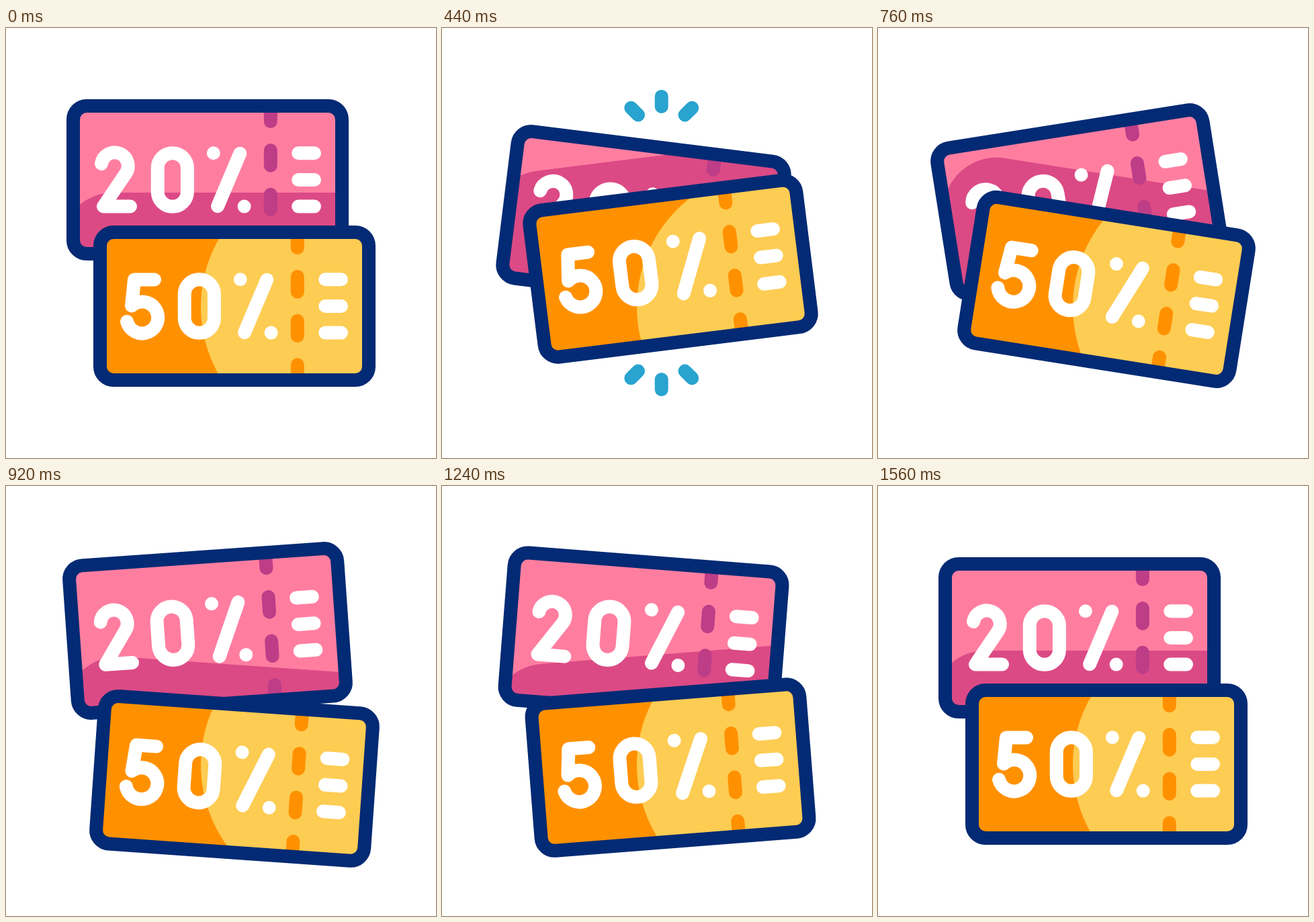
Recreate the animation shown at these times as an HTML page without scripts. Size 640 by 640 pixels, loop 2.04 s.

```html
<!DOCTYPE html>
<html lang="en">
<head>
<meta charset="utf-8">
<title>Discount coupons</title>
<style>
  @property --head { syntax: "<number>"; inherits: true; initial-value: 0; }
  @property --tail { syntax: "<number>"; inherits: true; initial-value: 0; }

  :root {
    --loop: 2040ms;
    --ease: cubic-bezier(.333, 0, .667, 1);
    --navy: #032a74;
  }
  html, body { margin: 0; height: 100%; overflow: hidden; background: #fff; }
  svg { display: block; width: 100vw; height: 100vh; }

  /* Each coupon is drawn around its own centre, then placed and tilted. */
  .back, .front { animation: var(--loop) var(--ease) infinite; }
  .back { translate: 300px 226px; animation-name: tilt-back, move-back; }
  .front { translate: 340px 414px; animation-name: tilt-front, move-front; }

  @keyframes tilt-back {
    0%, 76.471%, 100% { rotate: 0deg; }
    17.647% { rotate: 9deg; }
    37.255% { rotate: -9deg; }
    56.863% { rotate: 5deg; }
  }
  @keyframes tilt-front {
    0%, 76.471%, 100% { rotate: 0deg; }
    17.647% { rotate: -9deg; }
    37.255% { rotate: 9deg; }
    56.863% { rotate: -5deg; }
  }
  @keyframes move-back {
    0%, 9.804%, 66.667%, 100% { translate: 300px 226px; }
    27.451% { translate: 300px 306px; }
    47.059% { translate: 300px 213px; }
  }
  @keyframes move-front {
    0%, 9.804%, 66.667%, 100% { translate: 340px 414px; }
    27.451% { translate: 340px 339px; }
    47.059% { translate: 340px 438px; }
  }

  .ink, .border, .tear, .sparks {
    fill: none;
    stroke: #fff;
    stroke-width: 20;
    stroke-linecap: round;
    stroke-linejoin: round;
  }
  .border { stroke: var(--navy); }
  .tear { stroke: currentColor; stroke-dasharray: 22.6 43; }
  .shadow { fill: #db4a85; stroke: #db4a85; stroke-width: 98; }

  .sparks {
    stroke: #29a3d0;
    animation: head var(--loop) var(--ease) infinite,
               tail var(--loop) var(--ease) infinite,
               flash var(--loop) step-end infinite;
  }
  .sparks line, #spark {
    stroke-dasharray: calc((var(--head) - var(--tail)) * 1px) 99px;
    stroke-dashoffset: calc(var(--tail) * -1px);
  }
  @keyframes head {
    0%, 17.647% { --head: 0; }
    29.412%, 100% { --head: 57; }
  }
  @keyframes tail {
    0%, 21.569% { --tail: 0; }
    33.333%, 100% { --tail: 57; }
  }
  @keyframes flash {
    0% { opacity: 0; }
    18% { opacity: 1; }
    33.2%, 100% { opacity: 0; }
  }
</style>
</head>
<body>
<svg viewBox="0 0 640 640" role="img" aria-label="Coupons for 20% and 50% off">
  <defs>
    <clipPath id="back-clip"><rect class="back" x="-200" y="-110" width="400" height="220" rx="20"/></clipPath>
    <clipPath id="front-clip"><rect class="front" x="-200" y="-110" width="400" height="220" rx="20"/></clipPath>

    <!-- everything the coupons share except the first digit -->
    <g id="coupon">
      <path class="tear" d="M93.8-109.5V108"/>
      <rect class="border" x="-200" y="-110" width="400" height="220" rx="20"/>
      <g class="ink">
        <rect x="-74.3" y="-39.8" width="44.2" height="79.6" rx="22.1"/>
        <path d="M48.3-39.3L15 39.3M8.8-39.7h.01M54.6 39.6h.01"/>
        <path d="M135.2-39.7h23.8M135.2 0h23.8M135.2 39.6h23.8"/>
      </g>
    </g>

    <line id="spark" y2="-57"/>
    <g id="burst">
      <use href="#spark" transform="translate(292 129.5) rotate(-45)"/>
      <use href="#spark" transform="translate(326.7 117)"/>
      <use href="#spark" transform="translate(361.5 129.5) rotate(45)"/>
    </g>
  </defs>

  <g class="sparks">
    <use href="#burst"/>
    <use href="#burst" transform="matrix(1 0 0 -1 0 640)"/>
  </g>

  <!-- the front coupon casts a wide shadow onto the back one -->
  <g clip-path="url(#back-clip)">
    <rect width="640" height="640" fill="#ff7ea0"/>
    <rect class="front shadow" x="-210" y="-120" width="420" height="240" rx="30"/>
  </g>
  <g class="back" color="#be3d87">
    <use href="#coupon"/>
    <path class="ink" d="M-158-24A20 20 0 1 1-122.2-8.8L-155 39.5H-115"/>
  </g>

  <!-- the light spot stays still while the coupon moves over it -->
  <g clip-path="url(#front-clip)">
    <rect width="640" height="640" fill="#ff9100"/>
    <circle cx="495" cy="415" r="205" fill="#fdcc53"/>
  </g>
  <g class="front" color="#ff9100">
    <use href="#coupon"/>
    <path class="ink" d="M-119-39.5H-149L-153-.5A23.5 23.5 0 1 1-160 23"/>
  </g>
</svg>
</body>
</html>
```
